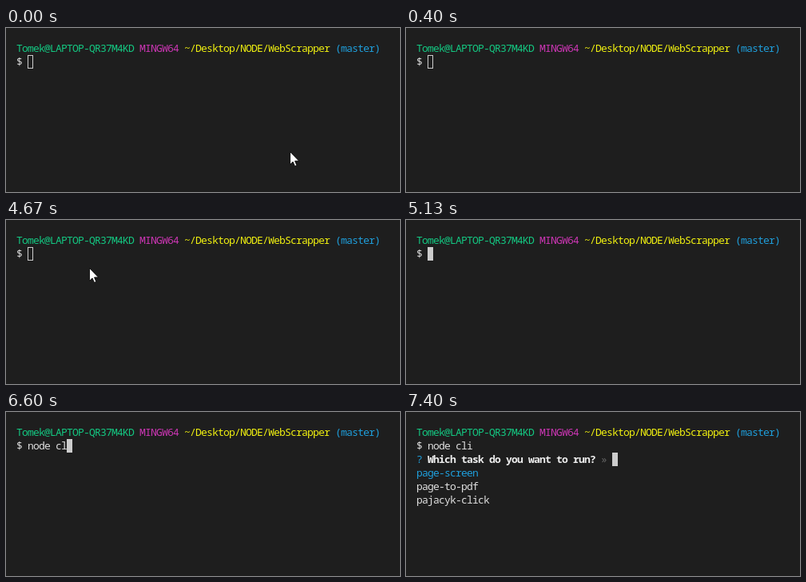
An HTML page for the animation above (8000 ms loop, 493x206 px).

```html
<!DOCTYPE html>
<html lang="en">
<head>
<meta charset="utf-8">
<title>Terminal</title>
<style>
  html, body { margin: 0; width: 100%; height: 100%; overflow: hidden; background: #1e1e1e; }
  .term {
    position: relative; width: 493px; height: 206px; overflow: hidden;
    background: #1e1e1e; color: #e0e0e0;
    font: 13px/17px "Noto Sans Mono", "DejaVu Sans Mono", monospace;
    letter-spacing: -.8px;
    font-variant-ligatures: none; white-space: pre;
  }
  .row { position: absolute; left: 13px; height: 17px; }
  .green { color: #14c882; }
  .magenta { color: #cc36b4; }
  .yellow { color: #f2f210; }
  .cyan { color: #1f9fdc; }
  .dim { color: #666; }
  b { color: #eee; }

  .typed, .caret, .output, .mouse { animation: 8s step-end infinite; }
  .typed { left: 27px; overflow: hidden; animation-name: type; }
  .output { top: 51px; visibility: hidden; animation-name: show; }
  .caret {
    position: absolute; left: 0; top: 0; width: 7px; height: 17px;
    box-shadow: inset 0 0 0 1px #ccc; animation-name: caret, focus;
  }
  .mouse { position: absolute; left: 0; top: 0; width: 12px; height: 19px; overflow: visible; animation-name: mouse; }

  @keyframes type {
    0% { width: 0; }
    74.125% { width: 7px; }
    75% { width: 14px; }
    77.5% { width: 21px; }
    78.375% { width: 28px; }
    80% { width: 35px; }
    81.625% { width: 42px; }
    82.5% { width: 49px; }
    85%, 100% { width: 56px; }
  }
  @keyframes caret {
    0% { transform: translate(27px, 34px); }
    74.125% { transform: translate(34px, 34px); }
    75% { transform: translate(41px, 34px); }
    77.5% { transform: translate(48px, 34px); }
    78.375% { transform: translate(55px, 34px); }
    80% { transform: translate(62px, 34px); }
    81.625% { transform: translate(69px, 34px); }
    82.5% { transform: translate(76px, 34px); }
    85% { transform: translate(83px, 34px); }
    88.375% { transform: translate(13px, 51px); }
    92.5%, 100% { transform: translate(258px, 51px); }
  }
  @keyframes focus {
    0% { background: transparent; }
    61.625%, 100% { background: #ccc; }
  }
  @keyframes show {
    0% { visibility: hidden; }
    92.5%, 100% { visibility: visible; }
  }
  @keyframes mouse {
    0% { transform: translate(355px, 155px); visibility: visible; }
    .875% { transform: translate(352px, 152px); }
    1.625% { transform: translate(341px, 142px); }
    2.5% { transform: translate(318px, 122px); }
    3.375% { transform: translate(278px, 91px); }
    4.125% { transform: translate(225px, 52px); visibility: visible; }
    5% { transform: translate(58px, 171px); visibility: hidden; }
    55% { transform: translate(58px, 171px); visibility: visible; }
    55.875% { transform: translate(69px, 140px); }
    56.625% { transform: translate(82px, 107px); }
    57.5% { transform: translate(94px, 79px); }
    58.375% { transform: translate(104px, 60px); }
    60% { transform: translate(111px, 50px); }
    63.375% { transform: translate(127px, 43px); visibility: visible; }
    64.125%, 100% { transform: translate(127px, 43px); visibility: hidden; }
  }
</style>
</head>
<body>
<div class="term">
  <div class="row" style="top:17px"><span class="green">Tomek@LAPTOP-QR37M4KD</span> <span class="magenta">MINGW64</span> <span class="yellow">~/Desktop/NODE/WebScrapper</span> <span class="cyan">(master)</span></div>
  <div class="row" style="top:34px">$</div>
  <div class="row typed" style="top:34px">node cli</div>
  <div class="row output"><span class="cyan">?</span> <b>Which task do you want to run?</b> <span class="dim">»</span>
<span class="cyan">page-screen</span>
page-to-pdf
pajacyk-click</div>
  <div class="caret"></div>
  <svg class="mouse" viewBox="0 0 12 19">
    <path d="M.5 .5V16.5L4 13L6.5 18.5L8.8 17.5L6.5 12H11.5Z" fill="#fff" stroke="#000" stroke-width=".8"/>
  </svg>
</div>
</body>
</html>
```
